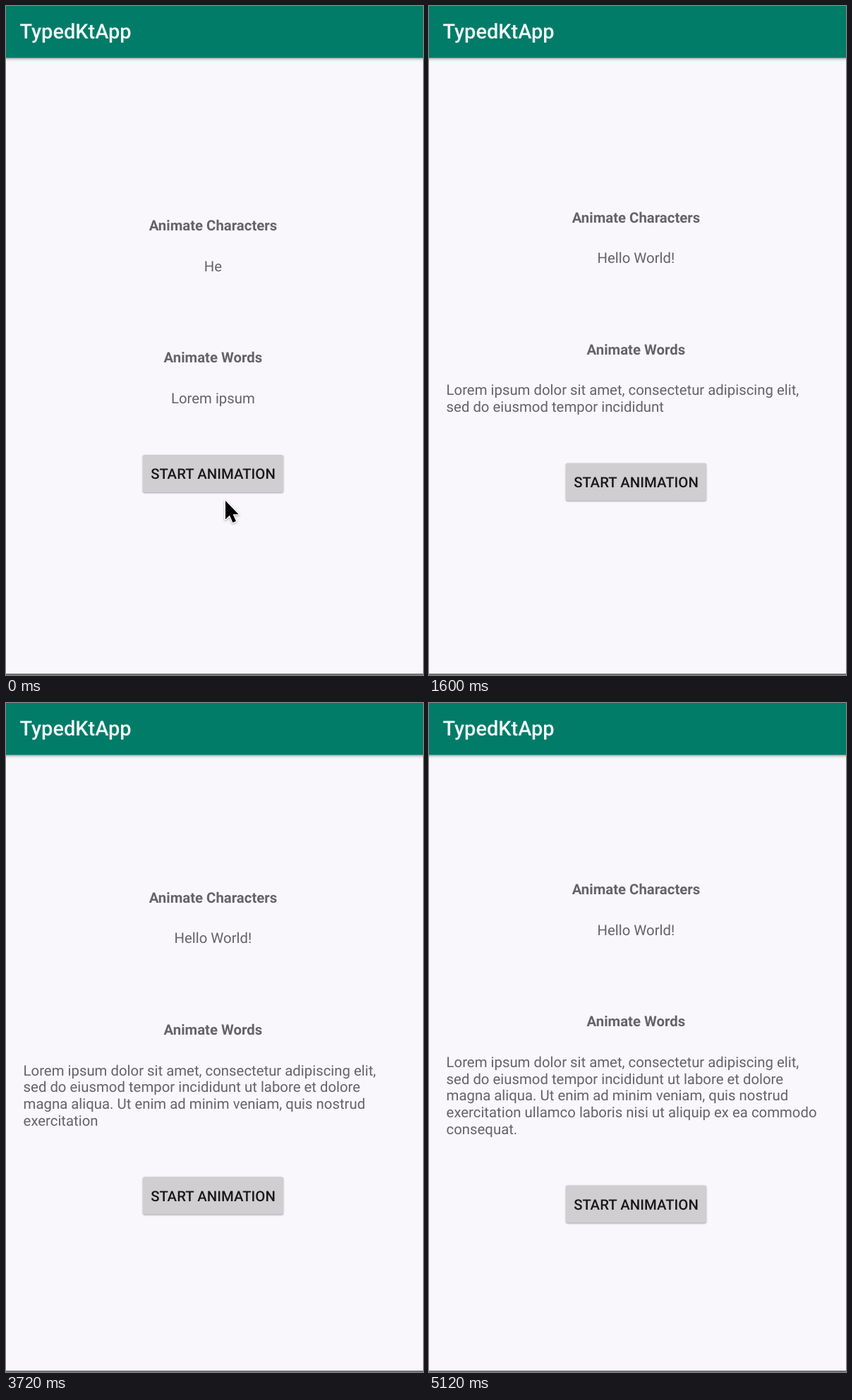
An HTML page for the animation above (5720 ms loop, 591x948 px).

```html
<!DOCTYPE html>
<html lang="en">
<head>
<meta charset="utf-8">
<title>TypedKtApp</title>
<style>
  html, body { margin: 0; width: 100%; height: 100%; overflow: hidden; background: #f9f7fb; }
  svg { display: block; }
  text {
    font: 20.35px Roboto, sans-serif;
    fill: #656367;
    white-space: pre;
    text-rendering: geometricPrecision;
  }
  .mid { text-anchor: middle; }
  .bold { font-weight: 700; }
  .title { font-size: 29px; font-weight: 500; fill: #f2faf8; }
  .label { font-weight: 500; fill: #18171a; }
  .bar { filter: drop-shadow(0 1.5px 2px rgba(0, 0, 0, .42)); }
  .button { filter: drop-shadow(0 1.5px 1.2px rgba(0, 0, 0, .36)); }
  #cursor { filter: drop-shadow(0 1.5px 1.5px rgba(0, 0, 0, .35)); }
</style>
</head>
<body>
<svg width="591" height="948" viewBox="0 0 591 948">
  <rect width="591" height="948" fill="#f9f7fb"/>
  <rect class="bar" x="-10" y="-10" width="611" height="83.5" fill="#007c69"/>
  <text class="title" x="19.5" y="45.5">TypedKtApp</text>
  <g id="upper">
    <text class="mid bold" x="293.4" y="318.4">Animate Characters</text>
    <text class="mid" id="chars" x="293.4" y="376"></text>
    <text class="mid bold" x="293.4" y="505.4">Animate Words</text>
    <g id="lines"></g>
  </g>
  <g id="lower">
    <rect class="button" x="194" y="636" width="199" height="53" rx="2.5" fill="#d0ced1"/>
    <text class="mid label" x="293.5" y="670.2">START ANIMATION</text>
  </g>
  <path id="cursor" d="M0 0V26.5L6 20.8L10.4 31L15 29L10.6 19.2H18.6Z"
        fill="#000" stroke="#fff" stroke-width="2.6" paint-order="stroke" stroke-linejoin="round"/>
  <rect y="946" width="591" height="2" fill="#6f6e71"/>
</svg>
<script>
const LOOP = 5720;
const GREETING = "Hello World!";
const ROWS = [
  "Lorem ipsum dolor sit amet, consectetur adipiscing elit,",
  "sed do eiusmod tempor incididunt ut labore et dolore",
  "magna aliqua. Ut enim ad minim veniam, quis nostrud",
  "exercitation ullamco laboris nisi ut aliquip ex ea commodo",
  "consequat."
].map(row => row.split(" "));

// Times at which one more word (and one more character) appears.
const TICKS = [
  40, 200, 360, 520, 680, 840, 1000, 1120, 1280, 1440, 1600, 1760, 1920, 2040,
  2200, 2360, 2520, 2640, 2800, 2960, 3120, 3280, 3400, 3600, 3720, 3880,
  4040, 4200, 4360, 4520, 4640, 4800, 4960, 5120
];
const ROW_HEIGHT = 23.7;
const CENTER = 293.4, LEFT = 24.6, FIRST_BASELINE = 563.3;
const CURSOR_STEP = 40, CURSOR_GONE = 280;

const $ = id => document.getElementById(id);
const rowTexts = ROWS.map((_, i) => {
  const node = document.createElementNS("http://www.w3.org/2000/svg", "text");
  node.setAttribute("y", FIRST_BASELINE + i * ROW_HEIGHT);
  return $("lines").appendChild(node);
});

const shift = (id, y) => $(id).setAttribute("transform", `translate(0 ${y})`);

function showText(count) {
  $("chars").textContent = GREETING.slice(0, count).replace(/ /g, "\u00a0");
  let left = count, used = 0;
  ROWS.forEach((row, i) => {
    const words = row.slice(0, Math.max(0, left));
    rowTexts[i].textContent = words.join(" ");
    if (words.length) used++;
    left -= row.length;
  });
  const single = used === 1;
  for (const node of rowTexts) {
    node.setAttribute("x", single ? CENTER : LEFT);
    node.setAttribute("text-anchor", single ? "middle" : "start");
  }
  const grow = (used - 1) * ROW_HEIGHT / 2;
  shift("upper", -grow);
  shift("lower", grow);
}

function showCursor(time) {
  const p = Math.floor(time / CURSOR_STEP) * CURSOR_STEP / (CURSOR_GONE - CURSOR_STEP);
  $("cursor").setAttribute("transform", `translate(${311 + 176 * p * p} ${701 - 30 * p})`);
  $("cursor").setAttribute("visibility", time < CURSOR_GONE ? "visible" : "hidden");
}

let shown = 0;
function draw(time) {
  const count = 2 + TICKS.filter(t => t <= time).length;
  if (count !== shown) showText(shown = count);
  showCursor(time);
}

const start = performance.now();
function tick() {
  draw((performance.now() - start) % LOOP);
  requestAnimationFrame(tick);
}
tick();
</script>
</body>
</html>
```
